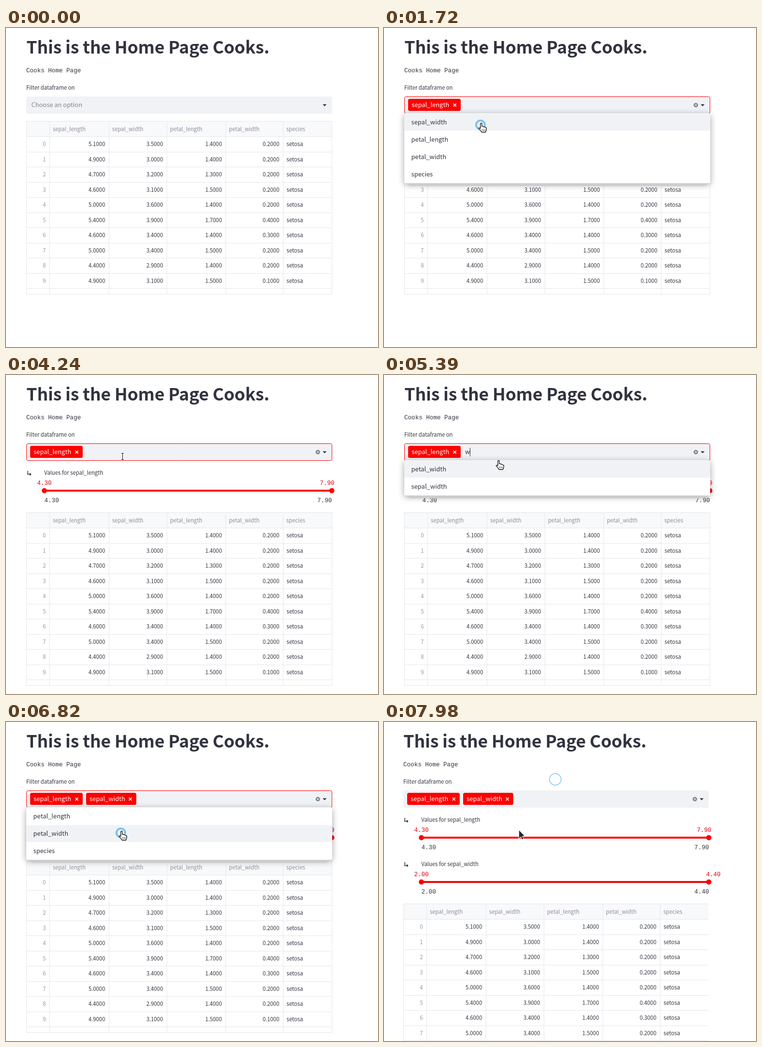
Write an HTML page with a canvas that moves like this. It is 771x662 px and loops after 8000 ms.

```html
<!DOCTYPE html>
<html lang="en">
<head>
<meta charset="utf-8">
<title>Dataframe filter</title>
<style>
html, body { margin: 0; width: 100%; height: 100%; overflow: hidden; background: #fff; }
canvas { display: block; }
</style>
</head>
<body>
<canvas id="stage" width="771" height="662"></canvas>
<script>
const ctx = document.getElementById('stage').getContext('2d');
const LOOP = 8000, BLINK = 588;
const INK = '#31333f', RED = '#f00', FIELD = '#f0f2f6', GRID = '#e6e7ea', MUTED = '#8b8d97';
const SANS = '"Noto Sans CJK JP", "Noto Sans CJK SC", "Noto Sans", sans-serif';
const MONO = '"Liberation Mono", "Noto Sans Mono", monospace';

// Font size factor, so that a size means the same em width in any family
function sizeFactor(family, sample, width) {
  ctx.font = `100px ${family}`;
  return width / ctx.measureText(sample).width;
}
const sansK = sizeFactor(SANS, 'sepal_length', 541.3);
const monoK = sizeFactor(MONO, '0000', 240);

const COLUMNS = ['sepal_length', 'sepal_width', 'petal_length', 'petal_width', 'species'];
const EDGES = [42, 90, 213, 333, 455, 574, 675];
const CELLS = [
  '5.1 4.9 4.7 4.6 5.0 5.4 4.6 5.0 4.4 4.9',
  '3.5 3.0 3.2 3.1 3.6 3.9 3.4 3.4 2.9 3.1',
  '1.4 1.4 1.3 1.5 1.4 1.7 1.4 1.5 1.4 1.5',
  '0.2 0.2 0.2 0.2 0.2 0.4 0.3 0.2 0.2 0.1'
].map(column => column.split(' '));
const ROW_COUNT = CELLS[0].length, ROW = 31.5, OPTION = 36;

// What happens when, in ms
const AT = {
  open: 790, pick: 1620, filter: 1800, close: 2460,
  typeW: 5390, typeI: 5780, pickNext: 6720, filterNext: 6920, blur: 7830
};
const CLICKS = [740, 1600, 2430, 6700, 7800];

// Pointer moves: start, end, then where it comes to rest
const ENTRY = { time: 430, x: 215, y: 245 };
const MOVES = [
  [430, 690, 192, 151], [830, 1120, 206, 331], [1250, 1460, 200, 201],
  [2190, 2410, 214, 154], [2520, 2780, 220, 213], [3960, 4240, 241, 169],
  [4550, 4710, 236, 181], [5780, 6030, 235, 212], [6340, 6560, 238, 230],
  [7000, 7480, 333, 131], [7520, 7640, 355, 119], [7830, 7980, 280, 225]
];

const ARROW = new Path2D('M0 0V16L3.8 12.5L6.3 18.5L8.8 17.4L6.3 11.6L11 11.3Z');
const HAND = new Path2D('M-1.5 1.5Q-1.5 0 0 0T1.5 1.5V6.5Q4.5 6 5 7.5Q7.5 7 8 8.5Q10.5 8.5 10.5 10.5L10 14L8.5 18H1L-1 15L-5 10.5Q-4.5 8 -1.5 10.5Z');

function text(str, x, y, size, color = INK, { mono = false, bold = false, align = 'left' } = {}) {
  const px = size * (mono ? monoK : sansK);
  ctx.font = `${bold ? 700 : 400} ${px}px ${mono ? MONO : SANS}`;
  ctx.textAlign = align;
  ctx.fillStyle = color;
  ctx.fillText(str, x, y);
}

function rect(x, y, w, h, color) {
  ctx.fillStyle = color;
  ctx.fillRect(x, y, w, h);
}

function box(x, y, w, h, r, color) {
  ctx.beginPath();
  ctx.roundRect(x, y, w, h, r);
  ctx.fillStyle = color;
  ctx.fill();
}

function disc(x, y, r, color) {
  ctx.beginPath();
  ctx.arc(x, y, r, 0, Math.PI * 2);
  ctx.fillStyle = color;
  ctx.fill();
}

function polygon(color, ...points) {
  ctx.beginPath();
  for (const [x, y] of points) ctx.lineTo(x, y);
  ctx.fillStyle = color;
  ctx.fill();
}

function cross(x, y, r, width, color) {
  ctx.beginPath();
  for (const s of [-1, 1]) {
    ctx.moveTo(x - r, y - r * s);
    ctx.lineTo(x + r, y + r * s);
  }
  ctx.strokeStyle = color;
  ctx.lineWidth = width;
  ctx.stroke();
}

function heading() {
  ctx.letterSpacing = '-0.14px';
  text('This is the Home Page Cooks.', 42.3, 53, 39.6, INK, { bold: true });
  ctx.letterSpacing = '0px';
  text('Cooks Home Page', 42, 92, 12.6, INK, { mono: true });
  text('Filter dataframe on', 42, 128, 12.6);
}

function tag(label, x, w) {
  box(x, 147, w, 25, 3.6, RED);
  text(label, x + 7.2, 164, 14.4, '#fff');
  cross(x + w - 12.3, 160, 3, 1.7, '#fff');
}

function typing(t) {
  const typed = t < AT.typeW ? '' : t < AT.typeI ? 'w' : 'wi';
  const lastKey = [AT.close - 270, AT.typeW, AT.typeI][typed.length];
  text(typed, 168, 164, 14.4);
  if (t >= lastKey && Math.floor((t - lastKey) / BLINK) % 2 === 0) {
    rect(Math.round(168 + ctx.measureText(typed).width), 151, 1, 18, INK);
  }
}

function select(t, right) {
  box(42, 142, right - 42, 36, 3.6, FIELD);
  if (t >= AT.open && t < AT.blur) {
    ctx.beginPath();
    ctx.roundRect(42.5, 142.5, right - 43, 35, 3.2);
    ctx.strokeStyle = RED;
    ctx.lineWidth = 1;
    ctx.stroke();
  }
  if (t < AT.pick) {
    text('Choose an option', 52.4, 164, 14.4, '#83858f');
  } else {
    tag('sepal_length', 50, 109);
    disc(646.3, 160, 4.6, '#83858c');
    cross(646.3, 160, 1.7, 1.1, FIELD);
  }
  if (t >= AT.pickNext) tag('sepal_width', 166, 104);
  else typing(t);
  polygon(INK, [656.3, 158.3], [664.5, 158.3], [660.4, 162.6]);
}

function slider(name, y, low, high, highX) {
  rect(44.5, y + 6, 1.5, 7.7, INK);
  rect(44.5, y + 12.3, 5.5, 1.4, INK);
  polygon(INK, [49, y + 9.8], [52.6, y + 13], [49, y + 16.2]);
  text('Values for ' + name, 79.2, y + 14, 12.6);

  text(low, 64.4, y + 35, 12.6, '#e0000c', { mono: true });
  text(high, highX, y + 35, 12.6, '#e0000c', { mono: true });
  rect(79.5, y + 45, 596, 4, RED);
  disc(79.5, y + 47, 5.4, RED);
  disc(675.2, y + 47, 5.4, RED);
  text(low, 79.5, y + 71, 12.6, INK, { mono: true });
  text(high, 675.5, y + 71, 12.6, INK, { mono: true, align: 'right' });
}

function table(y, right) {
  ctx.save();
  ctx.beginPath();
  ctx.rect(42, y, right - 42, 360);
  ctx.clip();
  rect(42, y, 634, 32, '#f8f9fb');
  for (let i = 0; i <= ROW_COUNT; i++) rect(42, Math.round(y + 32 + i * ROW), 634, 1, GRID);
  rect(42, y, 634, 1, GRID);
  rect(42, y + 359, 634, 1, GRID);
  for (const x of EDGES) rect(x, y, 1, 360, GRID);

  COLUMNS.forEach((name, i) => text(name, EDGES[i + 1] + 7, y + 21, 12.6, MUTED));
  for (let i = 0; i < ROW_COUNT; i++) {
    const base = Math.round(y + 52 + i * ROW);
    text(i, 82.5, base, 12.6, '#96979d', { align: 'right' });
    CELLS.forEach((column, c) => text(column[i] + '000', EDGES[c + 2] - 7.6, base, 12.6, INK, { align: 'right' }));
    text('setosa', 581.6, base, 12.6);
  }
  ctx.restore();
}

function menuAt(t) {
  if (t >= AT.open && t < AT.close) return t < AT.pick ? COLUMNS : COLUMNS.slice(1);
  if (t >= AT.typeW && t < AT.blur) {
    return t < AT.pickNext ? ['petal_width', 'sepal_width'] : COLUMNS.slice(2);
  }
  return [];
}

function menu(options, hover, right) {
  const w = right - 42, h = options.length * OPTION + 1;
  ctx.save();
  ctx.shadowColor = 'rgba(0,0,0,.36)';
  ctx.shadowBlur = 14;
  ctx.shadowOffsetY = 3;
  box(42, 177, w, h, 4, '#fff');
  ctx.restore();
  box(42, 177, w, h + 6, [4, 4, 16, 16], '#cdcdcf');
  box(42, 177, w, h, 3.6, '#fff');
  options.forEach((name, i) => {
    if (i === hover) rect(42, 178 + i * OPTION, w, 35, FIELD);
    text(name, 56.6, 200 + i * OPTION, 14.4);
  });
}

function pointerAt(t) {
  let { x, y } = ENTRY;
  for (const [from, to, endX, endY] of MOVES) {
    const p = Math.min(1, Math.max(0, (t - from) / (to - from)));
    const e = p * p * (3 - 2 * p);
    x += (endX - x) * e;
    y += (endY - y) * e;
  }
  return [x, y];
}

function ring(age, [x, y]) {
  if (age < 0 || age > 215) return;
  ctx.beginPath();
  ctx.arc(x, y, 3 + age * 0.05, 0, Math.PI * 2);
  ctx.strokeStyle = '#7cc2f2';
  ctx.lineWidth = Math.min(5, 9 - age * 0.0417);
  ctx.stroke();
}

function pointer([x, y], overMenu) {
  ctx.save();
  ctx.translate(Math.round(x), Math.round(y));
  ctx.lineJoin = 'round';
  if (overMenu) {
    ctx.translate(1.5, -3.5);
    ctx.scale(1.04, 1.04);
    ctx.fillStyle = '#fff';
    ctx.fill(HAND);
    ctx.strokeStyle = '#111';
    ctx.lineWidth = 1.3;
    ctx.stroke(HAND);
    for (let i = 0; i < 3; i++) rect(1.6 + i * 2.6, 12, 0.8, 3.5, '#111');
  } else if (y >= 142 && y < 178) {
    rect(0, -7, 1, 14, '#111');
    rect(-2, -7, 5, 1, '#111');
    rect(-2, 6, 5, 1, '#111');
  } else {
    ctx.strokeStyle = '#fff';
    ctx.lineWidth = 2;
    ctx.stroke(ARROW);
    ctx.fillStyle = '#26262c';
    ctx.fill(ARROW);
  }
  ctx.restore();
}

function draw(t) {
  const sliders = t < AT.filter ? 0 : t < AT.filterNext ? 1 : 2;
  // The page moves left when the scrollbar shows, briefly so on the first filter
  const shifted = sliders === 2 || (t >= AT.filter + 40 && t < AT.filter + 100);
  const right = shifted ? 675 : 676;
  const options = menuAt(t);
  const pos = pointerAt(t);
  const hover = Math.floor((pos[1] - 178) / OPTION);

  rect(0, 0, 771, 662, '#fff');
  ctx.save();
  if (shifted) ctx.translate(-2, 0);
  heading();
  select(t, right);
  if (sliders > 0) slider('sepal_length', 193, '4.30', '7.90', 650.4);
  if (sliders > 1) slider('sepal_width', 285, '2.00', '4.40', 669.4);
  table(193 + sliders * 92, right);
  if (options.length) menu(options, hover, right);
  ctx.restore();

  for (const time of CLICKS) ring(t - time, pointerAt(time));
  if (t >= ENTRY.time) pointer(pos, hover in options);
}

const start = performance.now();
function tick(now) {
  draw(Math.max(0, now - start) % LOOP);
  requestAnimationFrame(tick);
}
draw(0);
requestAnimationFrame(tick);
</script>
</body>
</html>
```
